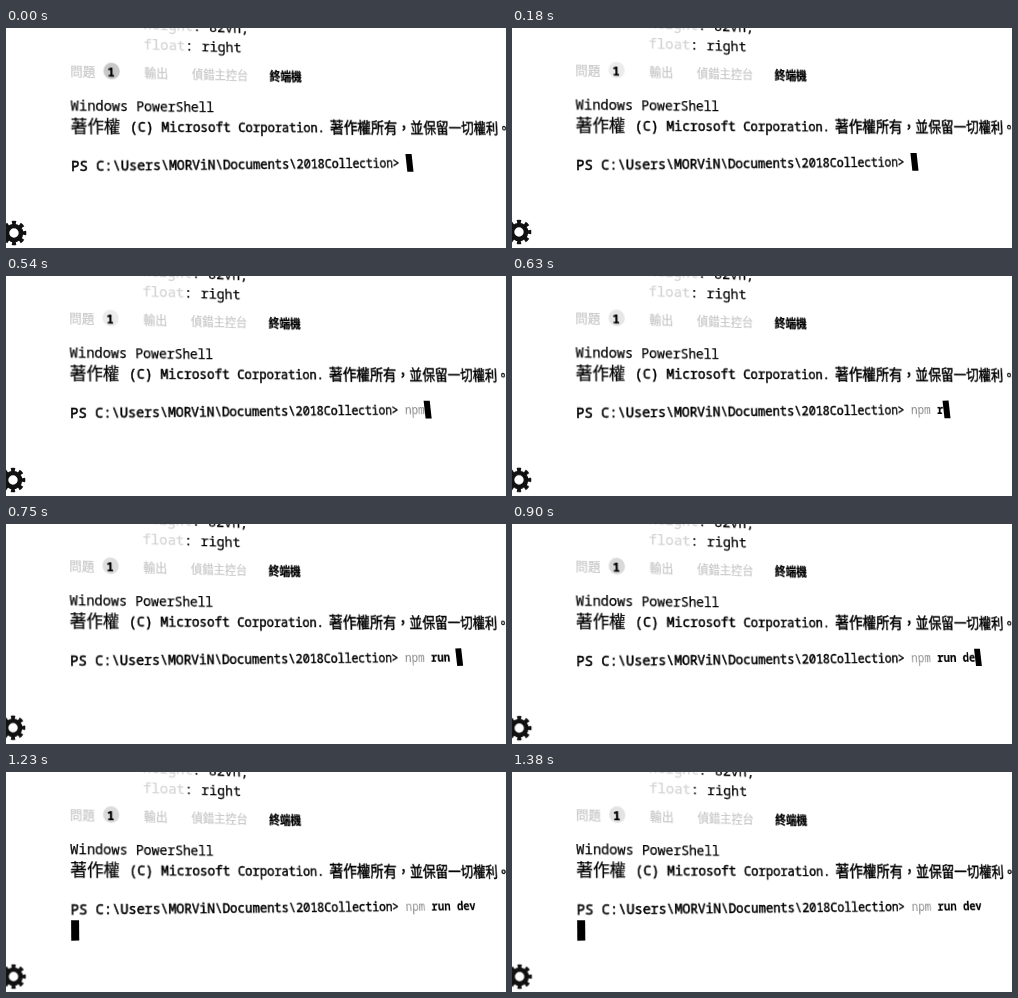
Recreate the animation shown at these times as an HTML page. Size 500 px wide and 220 px high, loop 1.41 s.

```html
<!DOCTYPE html>
<html lang="zh-Hant">
<head>
<meta charset="utf-8">
<title>Terminal</title>
<style>
  html, body { margin: 0; width: 100%; height: 100%; overflow: hidden; background: #fff; }
  .stage { position: relative; width: 500px; height: 220px; overflow: hidden; color: #000; }
  .camera { position: absolute; inset: 0; animation: drift 1410ms linear infinite; }

  /* The screen is seen at an angle: everything shrinks towards the right. */
  .screen {
    position: absolute; left: 0; top: 0; width: 600px; height: 1px;
    transform-origin: 0 0;
    transform: matrix3d(1.0232, .04, 0, .000357, 0, 1, 0, -.00012, 0, 0, 1, 0, 65, 138, 0, 1);
    font: 14.1px/20px "Noto Sans Mono", monospace;
  }
  .row {
    position: absolute; left: calc(var(--x, 0) * 1px); top: calc(var(--y) * 1px - 10px);
    display: flex; height: 20px; white-space: pre;
    -webkit-text-stroke: .25px currentColor;
  }
  .code { font-size: 15.1px; }
  .cjk, .tab { font-family: "Noto Sans CJK TC", "Noto Sans CJK JP", sans-serif; }
  .cjk { font-size: 16.9px; }
  .tab { font-size: 12.7px; color: #c8c8c8; }
  .tab.on { color: #000; font-weight: 700; }
  .dim { color: #d4d4d4; }
  .heavy { -webkit-text-stroke-width: .5px; }
  .badge {
    position: absolute; left: 33.5px; top: -104px; width: 17px; height: 17px;
    border-radius: 50%; background: #c8c8c8;
    animation: glare 1410ms linear infinite;
  }
  .one { font-weight: 700; font-size: 13px; }

  .typed { overflow: hidden; animation: type 1410ms step-end infinite; }
  .npm { color: #8c8c8c; -webkit-text-stroke-width: 0; }
  .args { font-weight: 700; -webkit-text-stroke-width: .1px; }
  .cursor { flex: none; width: 1ch; height: 20px; background: #000; animation: enter 1410ms step-end infinite; }

  .gear { position: absolute; left: -6px; top: 191px; }

  @keyframes drift {
    0% { transform: translate(0, 0); }
    12.8% { transform: translate(-1px, -1px); }
    23.4% { transform: translate(-1px, -1.2px); }
    38.3% { transform: translate(-1px, -1px); }
    53.2% { transform: translate(-1px, -1.3px); }
    76.6% { transform: translate(-.5px, -.5px); }
    97.9% { transform: translate(-.4px, -.4px); }
    100% { transform: translate(0, 0); }
  }
  @keyframes glare {
    0% { opacity: 1; }
    12.8%, 38.3% { opacity: .35; }
    53.2% { opacity: .6; }
    76.6% { opacity: .8; }
    97.9% { opacity: .5; }
    100% { opacity: 1; }
  }
  @keyframes type {
    0% { width: 0; }
    29.7% { width: 1ch; }
    34% { width: 2ch; }
    38.2% { width: 3ch; }
    42.5% { width: 4ch; }
    44.6% { width: 5ch; }
    46.8% { width: 6ch; }
    48.9% { width: 7ch; }
    53.1% { width: 8ch; }
    57.4% { width: 9ch; }
    61.7% { width: 10ch; }
    65.9%, 100% { width: 11ch; }
  }
  @keyframes enter {
    0% { transform: skewX(4deg); }
    74.4%, 100% { transform: translate(-56ch, 20.5px); }
  }
</style>
</head>
<body>
<div class="stage">
  <div class="camera">
    <div class="screen">
      <div class="row code" style="--x:76.5;--y:-146.5"><span class="dim">height</span>: 82vh;</div>
      <div class="row code" style="--x:76.5;--y:-125.5"><span class="dim">float</span>: right</div>

      <div class="row tab" style="--x:0;--y:-95">問題</div>
      <div class="badge"></div>
      <div class="row one" style="--x:38.1;--y:-95.5">1</div>
      <div class="row tab" style="--x:77;--y:-95">輸出</div>
      <div class="row tab" style="--x:128.5;--y:-95">偵錯主控台</div>
      <div class="row tab on" style="--x:217;--y:-95">終端機</div>

      <div class="row" style="--y:-60">Windows PowerShell</div>
      <div class="row cjk" style="--y:-40">著作權</div>
      <div class="row heavy" style="--x:60.5;--y:-39">(C) Microsoft Corporation.</div>
      <div class="row cjk heavy" style="--x:287;--y:-40">著作權所有，並保留一切權利。</div>
      <div class="row heavy" style="--y:0"><span>PS C:\Users\MORViN\Documents\2018Collection&gt; </span><span class="typed"><span class="npm">npm</span><span class="args"> run dev</span></span><span class="cursor"></span></div>
    </div>

    <svg class="gear" width="28" height="28" viewBox="-14 -14 28 28">
      <circle r="7" fill="none" stroke="#111" stroke-width="4.6"/>
      <circle r="10.3" fill="none" stroke="#111" stroke-width="4" pathLength="16" stroke-dasharray="1" stroke-dashoffset=".5"/>
    </svg>
  </div>
</div>
</body>
</html>
```
